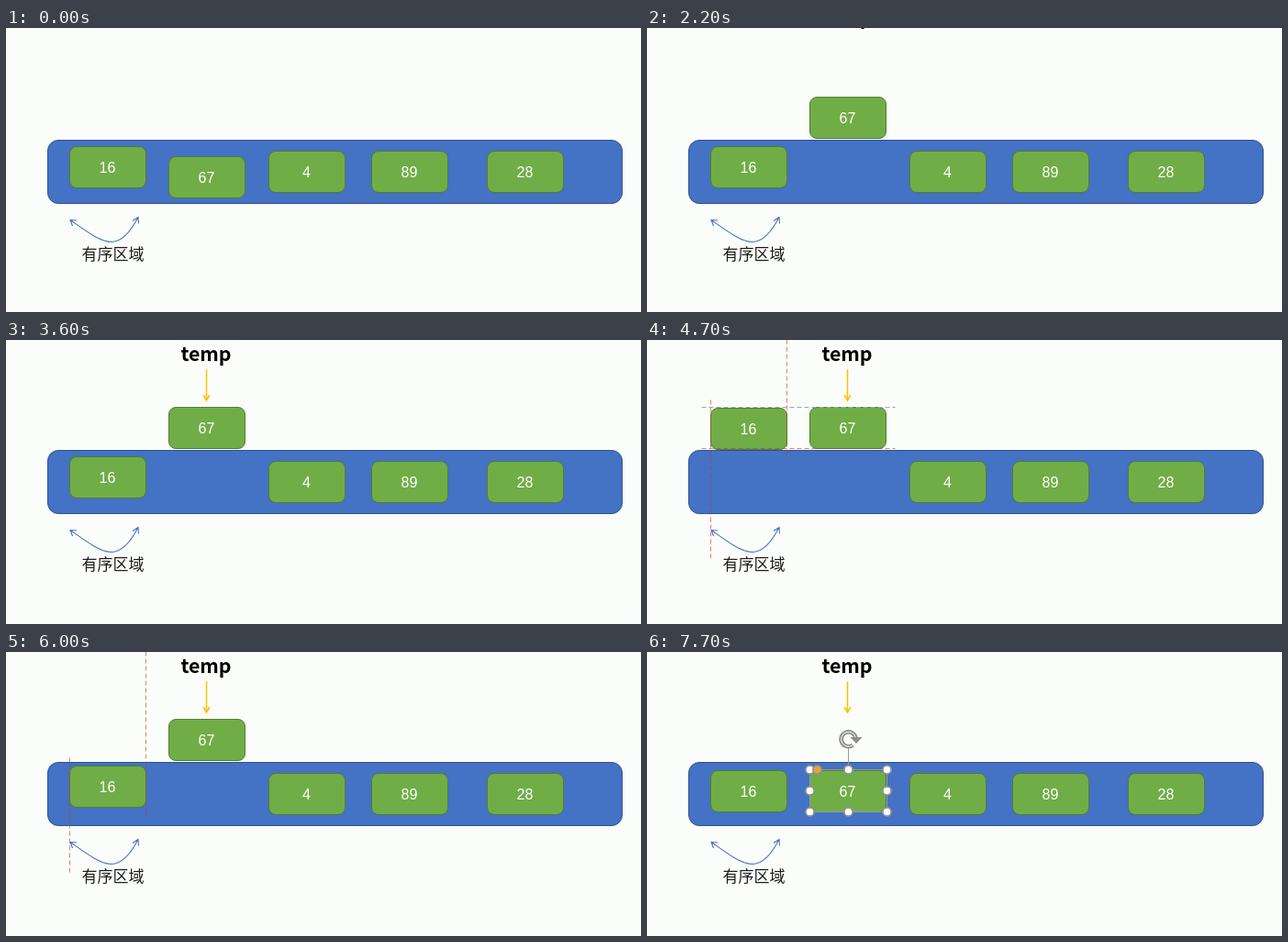
Recreate the animation shown at these times as an HTML page. Size 692 px wide and 310 px high, loop 8000 ms.

```html
<!DOCTYPE html>
<html lang="zh">
<head>
<meta charset="utf-8">
<style>
  html, body { margin: 0; width: 692px; height: 310px; overflow: hidden; background: #fbfdfa; }
  svg { display: block; }
  text { text-anchor: middle; }
  .num { font: 16px "Liberation Sans", Arial, sans-serif; fill: #fff; }
  .label { font: 300 17px "Noto Sans CJK SC", "Noto Sans CJK", sans-serif; fill: #1c1c1c; }
  .temp { font: bold 21.3px "Noto Sans CJK SC", "Noto Sans CJK", sans-serif; fill: #000; }
  .line { fill: none; }
</style>
</head>
<body>
<svg id="stage" width="692" height="310"></svg>
<script>
const LOOP = 8000, STEP = 100;
const W = 83, H = 45, X16 = 69, X67 = 177, BAR_TOP = 120, LIFTED = 73;
const GRAY = '#a3a69e', RED = 'rgba(195,60,40,.62)';
const stage = document.getElementById('stage');

const within = (t, from, to) => t >= from && t < to;
const near = (a, b, gap = 2) => Math.abs(a - b) < gap;

// Ease-out progress from 0 to 1; a higher power starts faster
function ease(t, from, to, power = 3.6) {
  const p = Math.min(1, Math.max(0, (t - from) / (to - from)));
  return 1 - (1 - p) ** power;
}

function block(x, y, n) {
  return `<rect x="${x + .5}" y="${y + .5}" width="${W}" height="${H}" rx="7.5" fill="#70ad47" stroke="#507e32"/>
    <text class="num" x="${x + 41.5}" y="${y + 29}">${n}</text>`;
}

function path(d, color, width = 1) {
  return `<path class="line" d="${d}" stroke="${color}" stroke-width="${width}"/>`;
}

function guide(x1, y1, x2, y2, color) {
  return `<path d="M${x1 + .5} ${y1 + .5}L${x2 + .5} ${y2 + .5}" stroke="${color}" stroke-dasharray="5 3"/>`;
}
const vGuide = (x, top, bottom, color = RED) => guide(x, top, x, bottom, color);
const hGuide = (y, left, right, color = RED) => guide(left, y, right, y, color);

function handle(x, y, fill = '#fff') {
  return `<circle cx="${x}" cy="${y}" r="4.6" fill="${fill}" stroke="#929292" stroke-width="1.7"/>`;
}

function selection(x, y) {
  const cx = x + 42.5, top = y - .5, left = x + .5;
  const iy = top - 33.5;
  const ring = `M${cx + 5} ${iy + 6.5}A8 8 0 1 1 ${cx + 8} ${iy - 1}`;
  let out = `<rect class="line" x="${left}" y="${top}" width="84" height="46" stroke="#999"/>` +
    path(`M${cx} ${iy + 9}V${top}`, '#999') +
    path(ring, '#8e8e8e', 4.6) + path(ring, '#fff', 1) +
    `<path d="M${cx + 2} ${iy - 2}h13l-6.5 7z" fill="#8e8e8e"/>`;
  for (let i = 0; i < 9; i++)
    if (i !== 4) out += handle(left + i % 3 * 42, top + Math.floor(i / 3) * 23);
  return out + handle(left + 8, top, '#f0a030');
}

// Lines that mark where the dragged block meets its neighbours
function guides(t, y16, y67) {
  const drag16 = within(t, 4400, 6400);
  const drag67 = within(t, 1200, 1600) || within(t, 6900, 7700);
  let out = '';
  if (drag67) out += vGuide(X67, -3, y67 + 55, GRAY);
  if (within(t, 2500, 3400)) out += vGuide(218, -3, 125);
  if (drag16) out += vGuide(X16, y16 - 9, 241) + vGuide(X16 + W, -1, y16 + 55);
  if (drag16 && near(y16, BAR_TOP, 3)) out += hGuide(BAR_TOP, 35, 682);
  if ((drag16 || drag67) && near(y16, y67))
    out += hGuide(y67, 59, 270, drag16 ? GRAY : RED) + hGuide(y67 + H, 59, 270);
  return out;
}

function selected(t, y16, y67) {
  if (within(t, 800, 1200) || within(t, 1600, 2200) || t >= 7700) return selection(X67, y67);
  return within(t, 6400, 6900) ? selection(X16, y16) : '';
}

function draw(t) {
  const scroll = t < 3600 ? 2 : 0;
  const y16 = Math.round(127 - 54 * ease(t, 4300, 4900) + 56 * ease(t, 5300, 6200, 1.6));
  const y67 = Math.round(138 - 65 * ease(t, 1100, 1600) + 56 * ease(t, 6800, 7300, 1.6));
  const tempY = 23 + scroll / 2 - 50 * (1 - ease(t, 2100, 2500, 2));
  const arrowY = 32 - 90 * (1 - ease(t, 2400, 2900, 2));

  stage.innerHTML = `<g transform="translate(0 ${scroll})">
    <rect x="45.5" y="${BAR_TOP + .5}" width="626" height="69" rx="11.5" fill="#4472c4" stroke="#2f528f"/>
    ${block(286, 132, 4)}${block(398, 132, 89)}${block(524, 132, 28)}
    ${block(X16, y16, 16)}${block(X67, y67, 67)}
    ${path('M70 207.5C85 218 102 231.5 115 231.5S137 218 144 204.5M77 208L70 207.5L72.5 214M144.5 211.5L144 204.5L138 208.5', '#4472c4', 1.1)}
    <text class="label" x="116.5" y="251">有序区域</text>
    ${path(`M218.5 ${arrowY}v34m-3.5 -6l3.5 6l3.5 -6`, '#ffc000', 1.5)}
    ${guides(t, y16, y67)}${selected(t, y16, y67)}
  </g>
  <text class="temp" x="218" y="${tempY}">temp</text>`;
}

let shown = -1;
function tick() {
  const t = Math.floor(performance.now() % LOOP / STEP) * STEP;
  if (t !== shown) draw(shown = t);
  requestAnimationFrame(tick);
}
tick();
</script>
</body>
</html>
```
